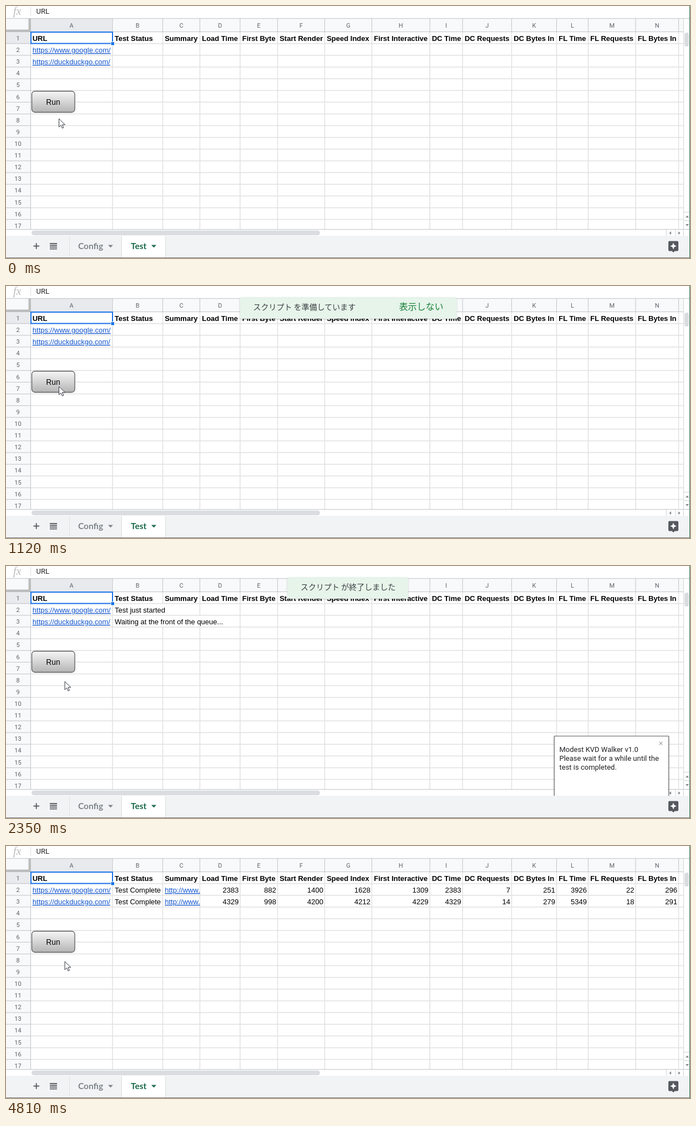
These frames come from a looping animation (1233 px wide and 454 px high, 6620 ms). An HTML page:

```html
<!DOCTYPE html>
<html lang="ja">
<head>
<meta charset="utf-8">
<title>Sheet test run</title>
<style>
html, body { margin: 0; width: 100%; height: 100%; overflow: hidden; background: #fff; }
svg { display: block; }
text { white-space: pre; }
.cell { font: 13px "Liberation Sans", Arial, sans-serif; fill: #000; }
.bold { font-weight: 700; }
.link { fill: #1155cc; text-decoration: underline; text-decoration-skip-ink: none; }
.label { font: 11px Roboto, sans-serif; fill: #5f6368; text-anchor: middle; }
.ui { font: 13px Roboto, sans-serif; fill: #202124; }
.tab { font: 700 15.5px Lato, sans-serif; }
.jp { font: 14px "Noto Sans CJK JP", "Noto Sans CJK", sans-serif; fill: #3c4043; }
.green { fill: #188038; }
</style>
</head>
<body>
<svg id="stage" width="1233" height="454" viewBox="0 0 1233 454">
  <defs>
    <linearGradient id="metal" x2="0" y2="1">
      <stop offset="0" stop-color="#f6f6f6"/>
      <stop offset="1" stop-color="#b4b4b4"/>
    </linearGradient>
    <filter id="soft" x="-10%" y="-20%" width="120%" height="160%">
      <feDropShadow dx="0" dy="1" stdDeviation="1" flood-opacity=".22"/>
    </filter>
    <filter id="lift" x="-10%" y="-10%" width="120%" height="120%">
      <feDropShadow dx="0" dy="1" stdDeviation="1.6" flood-opacity=".45"/>
    </filter>
    <clipPath id="above"><path d="M0 0H1233V414H0z"/></clipPath>
  </defs>
</svg>
<script>
const LOOP = 6620;
const NS = "http://www.w3.org/2000/svg";
const stage = document.getElementById("stage");
const cols = [44, 192, 282.5, 349.5, 422, 489.5, 574.5, 659.5, 764, 823, 911.5, 992.5, 1049.5, 1135, 1212.5];
const heads = ["URL", "Test Status", "Summary", "Load Time", "First Byte", "Start Render", "Speed Index",
  "First Interactive", "DC Time", "DC Requests", "DC Bytes In", "FL Time", "FL Requests", "FL Bytes In"];
const results = [
  [2383, 882, 1400, 1628, 1309, 2383, 7, 251, 3926, 22, 296],
  [4329, 998, 4200, 4212, 4229, 4329, 14, 279, 5349, 18, 291]
];
const EDGE = "#c0c3c5", GRID = "#e1e1e1", PALE = "#f8f9fa", DARK = "#5f6368";

function add(tag, attrs, parent = stage) {
  const el = document.createElementNS(NS, tag);
  for (const k in attrs) el.setAttribute(k, attrs[k]);
  return parent.appendChild(el);
}
const group = (attrs = {}) => add("g", attrs);
const rect = (x, y, width, height, fill, parent, more = {}) =>
  add("rect", { x, y, width, height, fill, ...more }, parent);
const path = (d, fill, parent, more = {}) => add("path", { d, fill, ...more }, parent);
const line = (d, stroke, width = 1, parent) =>
  path(d, "none", parent, { stroke, "stroke-width": width });
function text(str, x, y, cls, parent, more = {}) {
  const el = add("text", { x, y, class: cls, ...more }, parent);
  el.textContent = str;
  return el;
}
const rowLine = n => 46.6 + 21.12 * n;
const baseline = n => Math.round(41.8 + 21.12 * n);

function drawGrid() {
  rect(0, 0, 1233, 454, "#fff");
  text("fx", 13, 16, "", stage, {
    style: 'font: italic 20px "Liberation Serif", serif', fill: "#bdbdbd"
  });
  line("M44.5 2V18", "#dadce0");
  text("URL", 54.5, 14, "ui");

  rect(0, 23, 1221, 24, PALE);
  rect(0, 46, 44, 356, PALE);
  rect(44, 23, 148, 24, "#e8eaed");
  rect(0, 47, 44, 21, "#e8eaed");
  for (let n = 1; n < 17; n++) {
    const y = rowLine(n);
    line(`M45 ${y}H1221`, GRID, 1.5);
    line(`M0 ${y}H44`, EDGE);
  }
  cols.forEach((x, i) => {
    if (i) line(`M${x} 47V402`, GRID, 1.5);
    line(`M${x} 23V46`, EDGE);
    if (i < 14) {
      text(String.fromCharCode(65 + i), (x + cols[i + 1]) / 2, 38.5, "label");
      text(heads[i], x + 3.7, 63, "cell bold");
    }
  });
  for (let n = 1; n <= 17; n++) text(n, 21.5, baseline(n) - 1, "label");
  line("M0 22.5H1233M0 46.5H1221M44.5 23V402M0 402.5H1233", EDGE);
  rect(40.5, 23, 4, 24, "#bcbcbc");
  rect(0, 42.5, 44.5, 4, "#bcbcbc");

  text("https://www.google.com/", 47.8, 84, "cell link");
  text("https://duckduckgo.com/", 47.8, 105, "cell link");
  rect(45, 47, 147, 20.5, "none", stage, { stroke: "#1a73e8", "stroke-width": 2 });
  rect(189, 64.5, 6.5, 6.5, "#1a73e8", stage, { stroke: "#fff" });
}

function drawChrome() {
  rect(1221, 47, 12, 355, "#fff");
  line("M1221.5 23V414M1221 371.5H1233M1221 386.5H1233M1190.5 403V414M1206.5 403V414", "#d2d4d6");
  rect(1223, 48, 8, 25, "#dadce0", stage, { rx: 4 });
  rect(46, 404.5, 520, 8.5, "#dadce0", stage, { rx: 4.2 });
  path("M1225 381l3-3.5 3 3.5zM1225 393l3 3.5 3-3.5zM1199 406l-3.5 3 3.5 3zM1212 406l3.5 3-3.5 3z", "#80868b");

  rect(0, 414, 1233, 40, "#f1f3f4");
  rect(209, 414, 78, 40, "#fff", stage, { filter: "url(#soft)" });
  line("M114.5 415V453M208.5 415V453M287.5 415V453", "#dfe1e3");
  line("M49.5 432.5H60M54.7 427.3V437.7", DARK, 2);
  line("M79 428H92M79 431.2H92M79 434.4H92M79 437.6H92", DARK, 1.9);
  text("Config", 130, 438, "tab", stage, { fill: "#80868b" });
  text("Test", 225, 438, "tab", stage, { fill: "#19694a" });
  path("M184 430.5h9l-4.5 4.7z", "#80868b");
  path("M262 430.5h9l-4.5 4.7z", "#19694a");
  path("M1196 423.5h14a2 2 0 0 1 2 2v14a2 2 0 0 1-2 2h-4.500l-2.500 2.500-2.500-2.500h-4.500a2 2 0 0 1-2-2v-14a2 2 0 0 1 2-2z", "#55595e");
  path("M1203 426.500l1.800 4.200 4.200 1.800-4.200 1.800-1.800 4.200-1.800-4.200-4.200-1.800 4.200-1.800z", "#fff");
  line("M0 453.5H1233", "#747a7e");
  line("M1232.5 0V454", "#2c7562");
}

function drawButton() {
  rect(46.5, 153.5, 77.5, 38, "url(#metal)", stage, { rx: 5.5, stroke: "#5c5c5c", "stroke-width": 1.3 });
  text("Run", 85, 178, "cell", stage, {
    style: "font-size: 13.8px", "text-anchor": "middle", fill: "#222"
  });
}

function drawStarted() {
  const g = group();
  rect(281, 69, 4, 19, "#fff", g);
  rect(281, 90, 4, 19, "#fff", g);
  rect(348, 90, 4, 19, "#fff", g);
  text("Test just started", 196, 84, "cell", g);
  text("Waiting at the front of the queue...", 196, 105, "cell", g);
  return g;
}

function drawResults() {
  const g = group();
  results.forEach((row, r) => {
    const y = baseline(r + 2);
    text("Test Complete", 196, y, "cell", g);
    text("http://www.", 286.2, y, "cell link", g);
    row.forEach((v, i) => text(v, cols[i + 4] - 2.6, y, "cell", g, { "text-anchor": "end" }));
  });
  return g;
}

function drawToast(x, width, msg, cancel, dismiss) {
  const g = group();
  rect(x, 20, width, 39, "#e6f4ea", g, { rx: 2, filter: "url(#soft)" });
  text(msg, x + 24, 43, "jp", g);
  if (cancel) text("キャンセル", x + 213.5, 43, "jp green", g, { "text-decoration": "underline" });
  if (dismiss) text("表示しない", x + width - 104, 43, "jp green", g, { style: "font-size: 16px" });
  return g;
}

function drawPopup() {
  const clip = group({ "clip-path": "url(#above)" });
  const g = add("g", {}, clip);
  rect(988.5, .5, 206, 130, "#fff", g, { stroke: "#6a6a6a", filter: "url(#lift)" });
  line("M1177.7 10.700l5.600 5.600m0-5.600l-5.600 5.600", "#9a9a9a", 1.1, g);
  text("Modest KVD Walker v1.0", 997.5, 29, "ui bold", g);
  text("Please wait for a while until the", 997.5, 45, "ui", g);
  text("test is completed.", 997.5, 61, "ui", g);
  return g;
}

drawGrid();
const started = drawStarted(), done = drawResults();
drawButton();
drawChrome();
const preparing = drawToast(421.5, 391, "スクリプト を準備しています", false, true);
const running = drawToast(383, 466, "スクリプト を実行しています", true, true);
const finished = drawToast(507, 218, "スクリプト が終了しました");
const popup = drawPopup();
const cursor = path("M.5 .5V15.500l3.500-3.300 2.500 5.400 2.300-1-2.400-5.300h4.900z", "#fff", stage,
  { stroke: "#33363f", "stroke-width": 1, "stroke-linejoin": "round" });

const show = (el, on) => el.setAttribute("visibility", on ? "visible" : "hidden");
const move = (el, x, y) => el.setAttribute("transform", `translate(${x} ${y})`);
const ramp = (t, a, b) => Math.min(1, Math.max(0, (t - a) / (b - a)));
// The screen refreshes only at these moments while something moves.
const ticks = [0, 570, 640, 1360, 1460, 1560, 1660, 2060, 2140, 2220, 2290, 2350];

function draw(t) {
  const held = ticks.filter(v => v <= t).pop();
  const up = ramp(held, 500, 640), away = ramp(held, 1260, 1660);
  move(cursor, 95 + 10.5 * away, 202.5 - 22 * up + 27 * away);
  move(popup, 0, 414 - 108 * ramp(held, 2090, 2305));
  show(popup, held > 2090 && t < 4140);
  show(preparing, t >= 1120 && t < 1460);
  show(running, t >= 1460 && t < 2350);
  show(finished, t >= 2350 && t < 3530);
  show(started, t >= 2060 && t < 4810);
  show(done, t >= 4810);
}

function tick() {
  draw(performance.now() % LOOP);
  requestAnimationFrame(tick);
}
tick();
</script>
</body>
</html>
```
